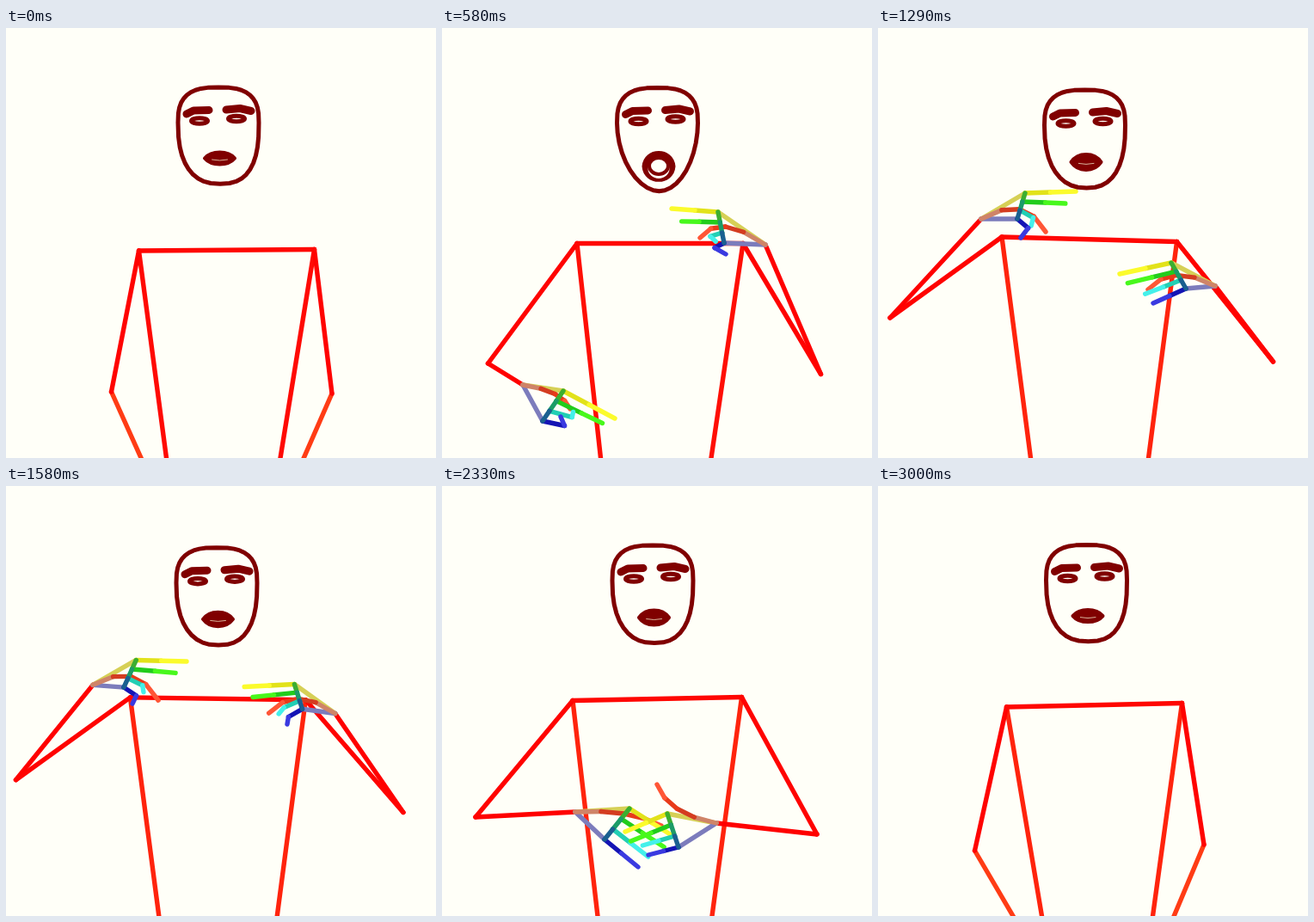
These frames come from a looping animation (500x500 px, 3.04 s). An HTML page with a canvas:

```html
<!DOCTYPE html>
<html lang="en">
<head>
<meta charset="utf-8">
<title>Signing pose</title>
<style>
html, body { margin: 0; width: 100%; height: 100%; overflow: hidden; background: #fffff8; }
canvas { display: block; width: 500px; height: 500px; }
</style>
</head>
<body>
<canvas id="stage" width="500" height="500"></canvas>
<script>
const ctx = document.getElementById('stage').getContext('2d');
const PAPER = '#fffff8', SKIN = '#800000';
const LOOP = 3040, STEPS = 73;

const clamp = (n, lo = 0, hi = 1) => Math.max(lo, Math.min(hi, n));
const mix = (a, b, k) => a.map((n, i) => n + (b[i] - n) * k);
const add = (a, b, k = 1) => a.map((n, i) => n + b[i] * k);
const ease = k => k * k * (3 - 2 * k);

// A hand is its wrist, then relative to it: index and little knuckles,
// reach of the index and little fingers, fold of the outer fingers, thumb tip
const hand = (wrist, index, little, reachI, reachL, fold, thumb) =>
  [...wrist, ...index, ...little, ...reachI, ...reachL, fold, ...thumb];
const hang = (h, x, y) => [x, y, ...h.slice(2)];

// One track per body part: a list of {at, v} keys
const tracks = {};
function key(at, parts) {
  for (const name in parts) (tracks[name] ||= []).push({ at, v: parts[name] });
}

const openL = hand([94,415], [47,7], [23,42], [60,32], [21,-5], 0.25, [55,28]);
const openR = hand([376,252], [-55,-38], [-48,-2], [-54,-4], [2,13], 0.22, [-76,-8]);
const crossL = hand([155,379], [63,-4], [34,32], [52,33], [39,32], 0, [100,16]);
const crossR = hand([319,392], [-57,-11], [-44,28], [-49,21], [-35,9], 0, [-69,-45]);

// torso: both shoulders, then waist x; head: shift x, y and mouth height
key(0, {
  torso: [154.5,259, 358.5,257.5, 186.5,319], head: [0,0,18],
  elbowL: [122.5,423], elbowR: [379,425],
  handL: hang(openL, 184, 560), handR: hang(openR, 320, 560)
});
key(14, {
  torso: [157,250.5, 350,250.5, 184.5,313], head: [3.5,0.5,36],
  elbowL: [53.5,390], elbowR: [440.5,402.5], handL: openL, handR: openR
});
key(23, {
  torso: [152,249.5, 347,250, 183.5,314.5], head: [-3.5,2.5,32],
  elbowL: [11,370], elbowR: [455.5,390.5],
  handL: hand([100,289], [58,-21], [37,11], [51,2], [19,13], 0, [74,-4]),
  handR: hand([391,278], [-54,-32], [-35,5], [-58,4], [-4,13], 0.2, [-74,-7])
});
key(26, { elbowL: [3,352], elbowR: [461,390] });
key(31, {
  torso: [144,243, 347.5,248.5, 177.5,314.5], head: [-6.5,3,22],
  elbowL: [14,337], elbowR: [459.5,388],
  handL: hand([120,222], [51,-30], [42,0], [59,-2], [4,22], 0.18, [75,15]),
  handR: hand([392,300], [-51,-27], [-34,3], [-60,13], [-38,17], 0, [-78,4])
});
key(39, { elbowR: [462,378] });
key(45, {
  torso: [145.5,249, 349,249, 178.5,316], head: [2.5,2,20],
  elbowL: [7,350], elbowR: [453.5,367],
  handL: hand([82,254], [50,-26], [30,9], [58,9], [21,16], 0.12, [78,19]),
  handR: hand([364,229], [-45,-41], [-43,-12], [-55,-7], [3,18], 0.25, [-75,-10])
});
key(51, { elbowL: [3,357], elbowR: [457,378] });
key(56, {
  torso: [152,249.5, 348.5,245.5, 181,314], head: [-2,0,21],
  elbowL: [39,385], elbowR: [436,405], handL: crossL, handR: crossR
});
key(65, {
  elbowL: [99,419], elbowR: [398,416],
  handL: hang(crossL, 198, 570), handR: hang(crossR, 319, 560)
});
key(72, {
  torso: [149.5,257, 353.5,252.5, 190.5,319.5], head: [-4.5,-0.5,18],
  elbowL: [112.5,424], elbowR: [379,417]
});

// Monotone cubic through the keys: no overshoot, at rest at both ends
function sample(keys, f) {
  let k = 0;
  while (k < keys.length - 2 && f >= keys[k + 1].at) k++;
  const a = keys[k], b = keys[k + 1], span = b.at - a.at;
  const u = clamp((f - a.at) / span);
  return a.v.map((n, i) => {
    const slope = j => (keys[j + 1].v[i] - keys[j].v[i]) / (keys[j + 1].at - keys[j].at);
    const tangent = j => {
      if (j === 0 || j === keys.length - 1) return 0;
      const p = slope(j - 1), q = slope(j);
      return p * q <= 0 ? 0 : 2 * p * q / (p + q);
    };
    const d = b.v[i] - n, m0 = tangent(k) * span, m1 = tangent(k + 1) * span;
    return n + u * (m0 + u * (3 * d - 2 * m0 - m1 + u * (m0 + m1 - 2 * d)));
  });
}

function line(points, color, width = 5.4) {
  ctx.beginPath();
  for (const [x, y] of points) ctx.lineTo(x, y);
  ctx.strokeStyle = color;
  ctx.lineWidth = width;
  ctx.stroke();
}

function oval(x, y, rx, ry, width, fill) {
  ctx.beginPath();
  ctx.ellipse(x, y, rx, ry, 0, 0, Math.PI * 2);
  if (fill) { ctx.fillStyle = fill; ctx.fill(); }
  if (width) { ctx.strokeStyle = SKIN; ctx.lineWidth = width; ctx.stroke(); }
}

// Superellipse whose chin gets longer and sharper as the jaw drops
function outline(drop) {
  const pts = [], N = 40;
  for (let i = 0; i <= N; i++) {
    const a = i / N * Math.PI * 2, c = Math.cos(a), s = Math.sin(a);
    const p = 2 / (s < 0 ? 2.8 : 2.4 - drop * 0.08);
    const x = Math.sign(c) * Math.abs(c) ** p;
    const y = Math.sign(s) * Math.abs(s) ** p;
    const lean = y > 0 ? 2 * y * y : 0;
    pts.push([247 + 47 * x + lean, 110 + y * (s < 0 ? 41 : 73 + drop)]);
  }
  return pts;
}

function drawMouth(x, top, h) {
  const open = clamp((h - 22) / 10), w = 17.5, r = h / 2, y = top + r;
  const cx = w * (0.55 + 0.35 * open), cy = (r - 2) * 1.33;
  ctx.beginPath();
  ctx.moveTo(x - w, y);
  ctx.bezierCurveTo(x - cx, y - cy, x + cx, y - cy, x + w, y);
  ctx.bezierCurveTo(x + cx, y + cy, x - cx, y + cy, x - w, y);
  ctx.fillStyle = ctx.strokeStyle = SKIN;
  ctx.lineWidth = 4;
  ctx.fill();
  ctx.stroke();
  if (open > 0.1) {
    oval(x, y + 2.5, 12.5, r - 6.5, 0, PAPER);
    oval(x, y - 0.5, 11, r - 8.5, 4);
  } else {
    line([[x - 9, y + 1.5], [x, y + 2.5], [x + 9, y + 1.5]], '#d8b49c', 1);
  }
}

function drawHead([dx, dy, h]) {
  ctx.save();
  ctx.translate(dx, dy);
  line(outline(clamp((h - 22) * 0.45, -2, 7)), SKIN, 5);
  line([[210,100], [218,96], [236,95.5]], SKIN, 9);
  line([[256,95], [272,93.5], [285,96.5]], SKIN, 9);
  oval(225, 108, 9.5, 3.2, 5);
  oval(268, 105.5, 9.5, 3.2, 5);
  drawMouth(248.5, 142.5 - dy * 0.2, h);
  ctx.restore();
}

const THUMB = ['#cf8468', '#d43c20', '#e83a1a', '#ff5636'];
const FINGERS = [
  ['#e2e21a', '#fbfb2c'], ['#22cc1c', '#48f81c'],
  ['#22cfb4', '#44f0ea'], ['#1414b4', '#3a3ae0']
];
const PALM = ['#3cae30', '#1c9c68', '#1a6090'];

function drawHand(h) {
  const pair = i => [h[2 * i], h[2 * i + 1]];
  const wrist = pair(0), index = add(wrist, pair(1)), little = add(wrist, pair(2));
  const reachI = pair(3), reachL = pair(4), fold = h[10];
  const tip = add(wrist, h.slice(11));
  const knuckle = n => mix(index, little, n / 3);
  // The thumb arcs from wrist to tip, pulled towards the index knuckle
  const thumb = u => mix(mix(wrist, index, u), mix(index, tip, u), u);

  line([wrist, index], '#d6d056');
  line([wrist, little], '#7c7cbc');
  THUMB.forEach((c, i) => line([thumb(i / 4), thumb((i + 1) / 4)], c));
  FINGERS.forEach(([base, end], n) => {
    const s = ease(ease(n / 3)), k = knuckle(n), reach = mix(reachI, reachL, s);
    const joint = add(add(k, reach, 0.5), reachI, fold * s);
    line([k, joint], base);
    line([joint, add(k, reach)], end);
  });
  PALM.forEach((c, n) => line([knuckle(n), knuckle(n + 1)], c));
}

const red = g => `rgb(255,${Math.round(g * 0.85)},${Math.round(g * 0.3)})`;

function drawSide(shoulder, waist, elbow, wrist, f) {
  const hip = mix(shoulder, [waist, 500], 1.1);
  line([shoulder, hip], red(12 + 30 * clamp(f / 31) ** 2));
  line([elbow, wrist], red(70 * clamp((wrist[1] - 420) / 140)));
  line([shoulder, elbow], red(4));
}

function draw(f) {
  const p = {};
  for (const name in tracks) p[name] = sample(tracks[name], f);
  const left = p.torso.slice(0, 2), right = p.torso.slice(2, 4);

  ctx.fillStyle = PAPER;
  ctx.fillRect(0, 0, 500, 500);
  ctx.lineCap = ctx.lineJoin = 'round';
  drawSide(left, p.torso[4], p.elbowL, p.handL.slice(0, 2), f);
  drawSide(right, p.torso[5], p.elbowR, p.handR.slice(0, 2), f);
  line([left, right], red(8));
  drawHand(p.handL);
  drawHand(p.handR);
  drawHead(p.head);
}

// 24 steps a second, each start rounded to 10 ms
const startOf = n => Math.round(n * 25 / 6) * 10;

function tick() {
  const t = performance.now() % LOOP;
  let n = STEPS - 1;
  while (n > 0 && startOf(n) > t) n--;
  draw(n);
  requestAnimationFrame(tick);
}
tick();
</script>
</body>
</html>
```
